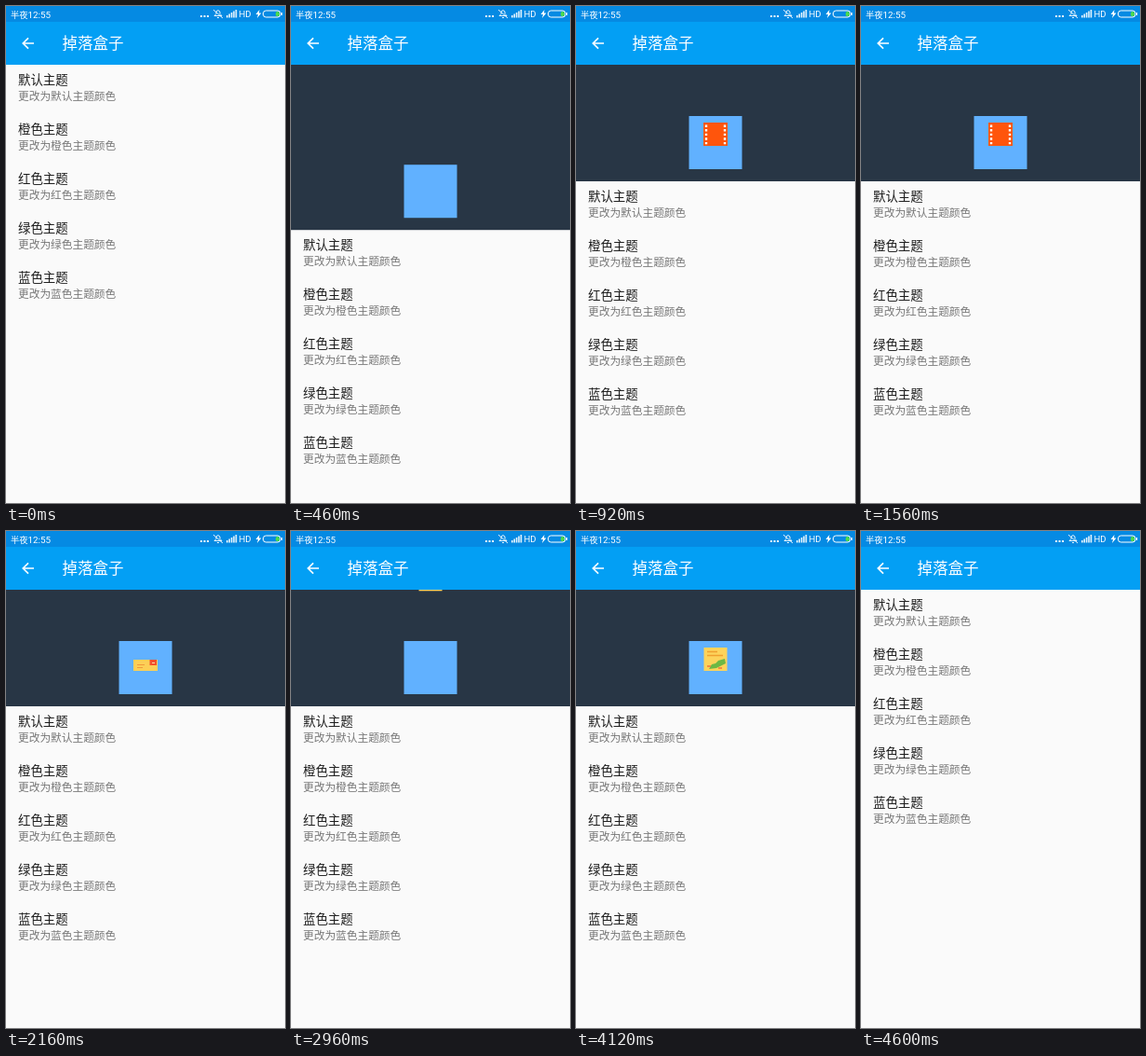
An HTML page for the animation above (4.62 s loop, 300 by 533 pixels).

```html
<!DOCTYPE html>
<html lang="zh-CN">
<head>
<meta charset="utf-8">
<style>
html, body { margin: 0; width: 100%; height: 100%; overflow: hidden; background: #fafafa; }
svg { display: block; width: 100vw; height: 100vh; }
text { font-family: "Noto Sans CJK SC", "Noto Sans CJK", sans-serif; }
</style>
</head>
<body>
<svg viewBox="0 0 300 533">
  <defs>
    <clipPath id="slot"><rect y="-300" width="300" height="262"/></clipPath>
  </defs>
  <rect y="63" width="300" height="470" fill="#283645"/>

  <g id="header">
    <rect x="121.5" y="-70" width="57" height="57" fill="#61b1ff"/>
    <g clip-path="url(#slot)">
      <g class="item">
        <rect x="137" width="26" height="50" fill="#ff550c"/>
        <path d="M140 2.5V50M160 2.5V50" stroke="#fff" stroke-width="2.4" stroke-dasharray="2.4 2.2"/>
      </g>
      <g class="item">
        <rect x="137" width="26" height="24" fill="#fccf56"/>
        <path d="M154.500 0H162V6H154.500Z" fill="#f4502c"/>
        <path d="M157 3.500H160" stroke="#fbd9a0"/>
        <path d="M141 5.500H149M141 8.500H147" stroke="#ef9a3c"/>
      </g>
      <g class="item">
        <rect x="137.500" width="25" height="50" fill="#fdd35b"/>
        <path d="M141 4.500H152M141 8.500H158" stroke="#f0a02f" stroke-width="1.300"/>
        <path d="M143 23L146 18L150 17L153 14L160 12L161 17L155 20L151 22Z" fill="#6db844"/>
        <path d="M141 20H145M153 22H157" stroke="#f0763a" stroke-width="1.500"/>
      </g>
    </g>
  </g>

  <g id="list"><rect y="63" width="300" height="470" fill="#fafafa"/></g>

  <rect width="300" height="17" fill="#058ae3"/>
  <rect y="17" width="300" height="46" fill="#039ff4"/>
  <path d="M30 40H18.500M24 34.300L18.300 40L24 45.700" fill="none" stroke="#fff" stroke-width="1.700"/>
  <text x="60.500" y="46.300" font-size="16.500" font-weight="500" fill="#fff">掉落盒子</text>

  <g fill="#fff">
    <text x="5" y="12.500" font-size="9.300">半夜<tspan font-family="Roboto, sans-serif" font-size="9.800">12:55</tspan></text>
    <path d="M209 10h2v2h-2zM212.500 10h2v2h-2zM216 10h2v2h-2z"/>
    <path d="M237 10h1.600v2.500H237zM239.400 8.500h1.600v4h-1.600zM241.800 7h1.600v5.500h-1.600zM244.200 5.500h1.600v7h-1.600zM246.600 4h1.600v8.500h-1.600z" opacity=".9"/>
    <text x="250.500" y="12" font-size="9.500" style="font-family: Roboto, sans-serif">HD</text>
    <path d="M272.500 4L268.500 9H271L270 13L274.500 7.500H272Z"/>
  </g>
  <path d="M224 10.500L226 8.500V6Q228 3 230 6V8.500L232 10.500ZM227 12.500H229M223 4L233 13" fill="none" stroke="#fff" stroke-width=".9"/>
  <rect x="276.500" y="5" width="18.500" height="7" rx="3" fill="none" stroke="#fff"/>
  <path d="M296.500 7V10" stroke="#fff" stroke-width="1.200"/>
  <rect x="290" y="6" width="4" height="5" rx="1.500" fill="#49d84f"/>
</svg>
<script>
const LOOP = 4620, MAX_PULL = 187, OPEN = 125, FALL = 290;
const header = document.getElementById('header');
const list = document.getElementById('list');
const drops = [
  { start: 630, end: 1785, height: 50, rest: -63 },
  { start: 1785, end: 2930, height: 24, rest: -50 },
  { start: 2930, end: LOOP, height: 50, rest: -63 }
];
document.querySelectorAll('.item').forEach((el, i) => drops[i].el = el);

function addText(x, y, size, fill, content) {
  const el = document.createElementNS('http://www.w3.org/2000/svg', 'text');
  const attrs = { x, y, 'font-size': size, fill };
  for (const key in attrs) el.setAttribute(key, attrs[key]);
  el.textContent = content;
  list.append(el);
}
['默认', '橙色', '红色', '绿色', '蓝色'].forEach((name, i) => {
  addText(13, 84 + i * 53, 13.4, '#1c1c1c', name + '主题');
  addText(13, 100.5 + i * 53, 11.7, '#777', `更改为${name}主题颜色`);
});

const progress = (t, start, duration) => Math.min(1, Math.max(0, (t - start) / duration));
const easeOut = u => 1 - (1 - u) ** 2;
const easeInOut = u => u < .5 ? 2 * u * u : 1 - 2 * (1 - u) ** 2;
const shift = (el, y) => el.setAttribute('transform', `translate(0 ${y.toFixed(2)})`);

function headerHeight(t) {
  return MAX_PULL * easeInOut(progress(t, 0, 550))
    - (MAX_PULL - OPEN) * easeOut(progress(t, 570, 250))
    - OPEN * easeOut(progress(t, 4255, 250));
}

function draw(t) {
  const h = headerHeight(t);
  shift(header, 63 + h);
  shift(list, h);
  for (const { el, start, end, height, rest } of drops) {
    const top = -h - height;
    const fallen = progress(t, start, FALL) ** 2;
    el.style.display = t >= start && t < end ? '' : 'none';
    shift(el, top + (rest - top) * fallen);
  }
}

function tick() {
  draw(performance.now() % LOOP);
  requestAnimationFrame(tick);
}
tick();
</script>
</body>
</html>
```
